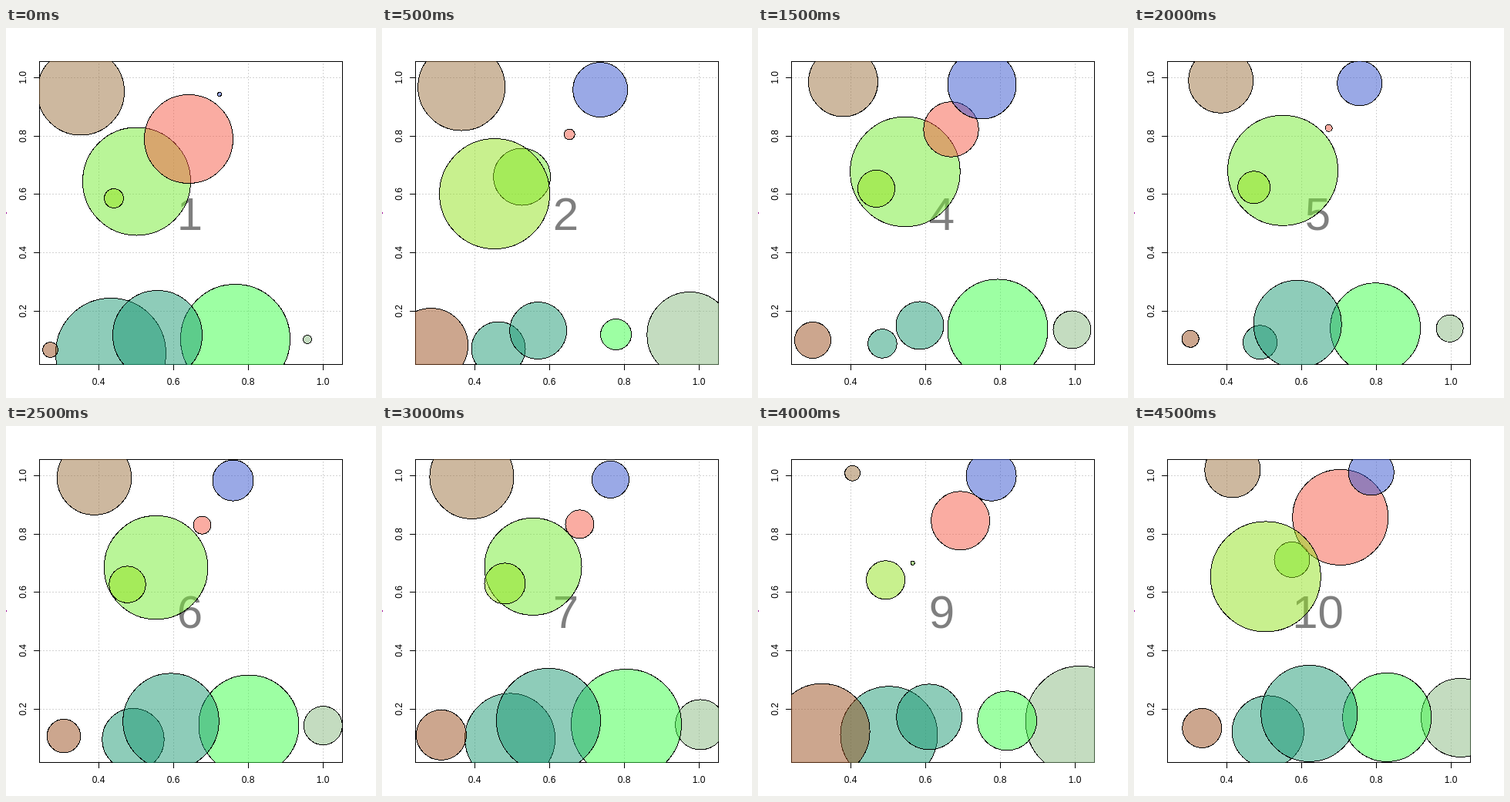
An HTML page for the animation above (5000 ms loop, 480x480 px).

```html
<!DOCTYPE html>
<html lang="en">
<head>
<meta charset="utf-8">
<title>Bubble chart</title>
<style>
  html, body { margin: 0; width: 100%; height: 100%; overflow: hidden; background: #fff; }
  svg { display: block; width: 480px; height: 480px; }
  text { font-family: "Liberation Sans", Arial, sans-serif; text-anchor: middle; }
  .label { font-size: 12px; }
  .count { font-size: 60px; fill: #7f7f7f; }
  .grid { stroke: #d3d3d3; stroke-dasharray: 2 2; }
  .frame { fill: none; stroke: #000; shape-rendering: crispEdges; }
  circle { fill-opacity: .5; stroke: #000; shape-rendering: crispEdges; }
</style>
</head>
<body>
<svg viewBox="0 0 480 480">
  <clipPath id="plot"><rect x="43" y="43" width="394" height="394"/></clipPath>
  <rect x="0" y="239" width="1" height="2" fill="#a0109a"/>
  <g id="axes"></g>
  <rect class="frame" x="43.5" y="43.5" width="393" height="393"/>
  <text class="count" id="count" x="238.5" y="262"></text>
  <g id="bubbles" clip-path="url(#plot)"></g>
</svg>
<script>
  const STEP_MS = 500, STEPS = 10;

  // Back to front: start point, key radii, and how far the path bends aside.
  const bubbles = [
    { color: '#9b7340', x: 97, y: 82.5, radii: [56.5, 56.5, 48, 42, 54.5, 10, 36] },
    { color: '#75eb33', x: 169.5, y: 199, bend: 8, radii: [70, 37, 71, 71.5, 63, 2.5, 23] },
    { color: '#f55b47', x: 237, y: 144, radii: [57.5, 7, 67, 4.5, 18.5, 38, 62] },
    { color: '#3755cd', x: 277, y: 86, radii: [2.5, 35.5, 60, 29, 24, 32.5, 29.5] },
    { color: '#91e11f', x: 140, y: 221, radii: [12.5, 71.5, 27, 21, 26.5, 25, 71.5] },
    { color: '#89b981', x: 391, y: 404, bend: 3, radii: [5.5, 55.5, 31.5, 17.5, 32.5, 71.5, 51] },
    { color: '#3cff48', x: 297.5, y: 403.5, radii: [71, 20, 71.5, 58.5, 71.5, 38.5, 57.5] },
    { color: '#1f9975', x: 136, y: 422, bend: 12, radii: [71.5, 35, 15.5, 22, 58.5, 63, 46.5] },
    { color: '#1f9975', x: 196.5, y: 398.5, radii: [58, 37, 5, 57, 67.5, 42.5, 62.5] },
    { color: '#994f1f', x: 57.5, y: 417.5, radii: [10, 48, 36, 11, 32.5, 62, 25.5] }
  ];

  const add = (parent, tag, attrs, text = '') => {
    const node = document.createElementNS('http://www.w3.org/2000/svg', tag);
    for (const key in attrs) node.setAttribute(key, attrs[key]);
    node.textContent = text;
    parent.append(node);
    return node;
  };

  const axes = document.getElementById('axes');
  const line = (cls, d) => add(axes, 'path', { class: cls, d });
  const label = (value, x, y, angle) => add(axes, 'text',
    { class: 'label', transform: `translate(${x} ${y}) rotate(${angle})` }, value.toFixed(1));

  for (let i = 0; i < 4; i++) {
    const x = 120.5 + 97 * i;
    line('grid', `M${x} 436V44`);
    line('frame', `M${x} 437v7`);
    label(.4 + .2 * i, x - .5, 463, 0);
  }
  for (let i = 0; i < 5; i++) {
    const y = Math.floor(367 - 75.6 * i) + .5;
    line('grid', `M44 ${y}H436`);
    line('frame', `M43 ${y}h-7`);
    label(.2 + .2 * i, 26, y, -90);
  }

  const layer = document.getElementById('bubbles');
  for (const b of bubbles) b.node = add(layer, 'circle', { fill: b.color });

  // All bubbles drift up and right: fast, slow, then fast again.
  const driftX = s => s * (7.2 - 1.14 * s + .08 * s * s);
  const driftY = s => -s * (7.1 - 1.22 * s + .083 * s * s);
  const bulge = s => Math.sin(.8 * Math.PI * Math.sqrt(s / 9));

  // Key radii fall on each outer step and on every second step between.
  function radiusAt(radii, step) {
    const p = step < 2 ? step : step > 8 ? 6 : 1 + step / 2;
    return (radii[Math.floor(p)] + radii[Math.ceil(p)]) / 2;
  }

  const count = document.getElementById('count');

  function draw(now) {
    const step = Math.floor(now / STEP_MS) % STEPS;
    count.textContent = step + 1;
    for (const { node, x, y, radii, bend = 0 } of bubbles) {
      node.setAttribute('cx', x + driftX(step) + bend * bulge(step));
      node.setAttribute('cy', y + driftY(step));
      node.setAttribute('r', radiusAt(radii, step));
    }
    requestAnimationFrame(draw);
  }
  draw(performance.now());
</script>
</body>
</html>
```
